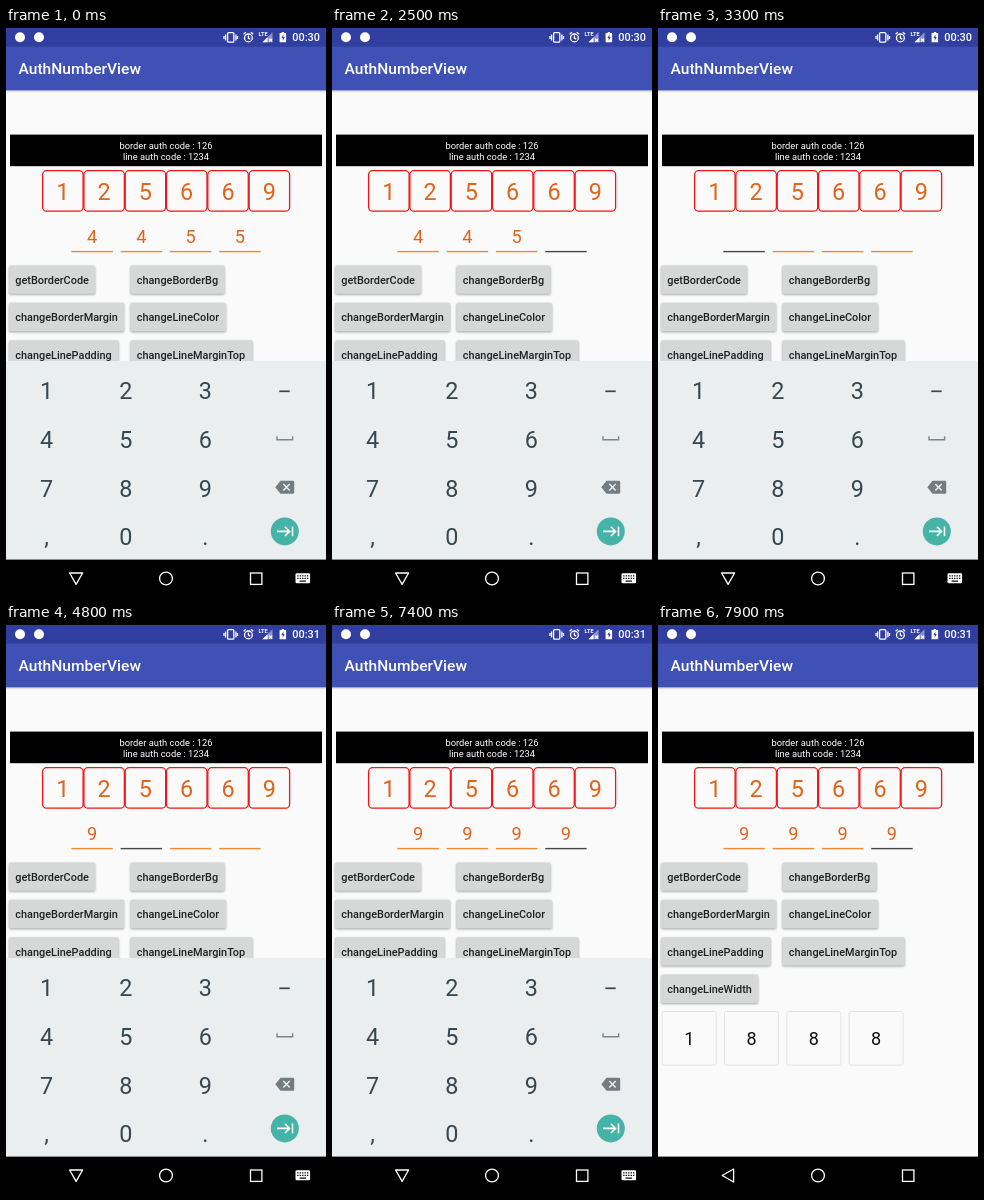
An HTML page for the animation above (8 s loop, 320 by 569 pixels).

```html
<!DOCTYPE html>
<html lang="en">
<head>
<meta charset="utf-8">
<title>AuthNumberView</title>
<style>
  html, body { margin: 0; width: 100%; height: 100%; overflow: hidden; background: #fafafa; }
  svg { display: block; width: 100%; height: 100%; font-family: Roboto, sans-serif; }
  .mid { text-anchor: middle; }
  .code { fill: #e0641c; }
  .button rect { fill: #d6d7d7; filter: drop-shadow(0 1px 1px rgba(0, 0, 0, .34)); }
  .button text { font-size: 10.9px; font-weight: 500; fill: #212121; }
  .key { font-size: 23.4px; fill: #37474f; }
  .outline { fill: none; stroke: #fff; stroke-width: 1.3; }
</style>
</head>
<body>
<svg viewBox="0 0 320 569" preserveAspectRatio="none">
  <defs>
    <linearGradient id="shade" x2="0" y2="1">
      <stop stop-opacity=".2"/>
      <stop offset="1" stop-opacity="0"/>
    </linearGradient>
  </defs>
  <rect width="320" height="569" fill="#fafafa"/>

  <rect y="62" width="320" height="3" fill="url(#shade)"/>
  <rect y="18" width="320" height="44.3" fill="#3f51b5"/>
  <rect width="320" height="18.7" fill="#303f9f"/>
  <text x="12.5" y="46.3" font-size="15.56" font-weight="500" fill="#fff">AuthNumberView</text>

  <g id="status" fill="#fff">
    <circle cx="14" cy="9.3" r="5"/>
    <circle cx="33" cy="9.3" r="5"/>
    <rect x="221.6" y="4.6" width="6.2" height="9.6" rx="1" class="outline"/>
    <path d="M219.6 6.5v6M218 8v3M229.9 6.5v6M231.5 8v3" class="outline" stroke-width="1"/>
    <circle cx="242.4" cy="9.9" r="3.9" class="outline"/>
    <path d="M242.4 7.5v2.6l1.8 1M237.6 6.3l2.3-2M247.2 6.3l-2.3-2" class="outline"/>
    <path d="M256.5 14.2l10-10v10z" opacity=".45"/>
    <path d="M256.5 14.2l5-5v5z"/>
    <text x="252.6" y="8.3" font-size="5.6" font-weight="700">LTE</text>
    <path d="M263.2 10.6l3 3m0-3l-3 3" class="outline" stroke-width="1"/>
    <path d="M275.7 4h2.4v1h2v9.3h-6.5V5h2.1z"/>
    <path d="M277.4 6.5l-2 3.6h1.3v2.6l2-3.6h-1.3z" fill="#303f9f"/>
    <text id="clock" x="286.3" y="13.2" font-size="10.9" font-weight="500"></text>
  </g>

  <rect x="4" y="106.6" width="312" height="31.6"/>
  <g class="mid" font-size="9.34" fill="#fff">
    <text x="160" y="120.5">border auth code : 126</text>
    <text x="160" y="131.5">line auth code : 1234</text>
  </g>

  <g id="page"></g>

  <g id="keyboard">
    <rect y="333" width="320" height="199" fill="#eaeeee"/>
    <rect id="press" y="435" width="79" height="48" fill="#d9dddd"/>
    <g id="keys" class="mid"></g>
    <path d="M273.3 363.3h10.4" stroke="#37474f" stroke-width="1.7"/>
    <path d="M271 408.3v3.4h15.6v-3.4" fill="none" stroke="#7b868a" stroke-width="1.4"/>
    <path d="M274.5 452.8h12.3q1.4 0 1.4 1.4v10.2q0 1.4-1.4 1.4h-12.3l-5.2-6.5z" fill="#737d81"/>
    <path d="M277.3 456l6.4 6.6m0-6.6l-6.4 6.6" stroke="#eaeeee" stroke-width="1.5"/>
    <circle cx="278.8" cy="503.4" r="14" fill="#45b3a7"/>
    <path d="M271 503.4h12.5m-4.6-4.6l4.6 4.6l-4.6 4.6M286.5 498.6v9.6" class="outline" style="stroke-width:1.6"/>
  </g>

  <rect y="531.6" width="320" height="38" fill="#000"/>
  <path id="back" d="M63.6 545h13l-6.5 11.4z" class="outline" stroke-linejoin="round"/>
  <circle cx="160" cy="550.5" r="6.4" class="outline"/>
  <rect x="244.5" y="545" width="11.4" height="11.4" class="outline"/>
  <g id="switcher">
    <rect x="289.5" y="545.3" width="14.6" height="10" rx="1.2" fill="#fff"/>
    <path d="M291.2 547.8h11.2M291.2 550.3h11.2" stroke="#000" stroke-width="1.3" stroke-dasharray="1.3 1.15"/>
    <path d="M293.6 553.1h6.4" stroke="#000" stroke-width="1.2"/>
  </g>
</svg>
<script>
const NS = 'http://www.w3.org/2000/svg';
const byId = id => document.getElementById(id);

function add(parent, tag, attrs, text = '') {
  const node = document.createElementNS(NS, tag);
  for (const name in attrs) node.setAttribute(name, attrs[name]);
  node.textContent = text;
  return parent.appendChild(node);
}

const page = byId('page');

[...'125669'].forEach((digit, i) => {
  const x = 36.6 + i * 41.3;
  add(page, 'rect', { x, y: 142.7, width: 40.5, height: 40.5, rx: 4, fill: 'none', stroke: '#f01414', 'stroke-width': 1.3 });
  add(page, 'text', { x: x + 20.2, y: 171.8, class: 'mid code', 'font-size': 23.4 }, digit);
});

const slots = [0, 1, 2, 3].map(i => {
  const x = 65.3 + i * 49.3;
  return {
    digit: add(page, 'text', { x: x + 20.7, y: 215.2, class: 'mid code', 'font-size': 18.2 }),
    line: add(page, 'rect', { x, y: 222.9, width: 41.5, height: 1.4 })
  };
});

[
  [['getBorderCode', 86], ['changeBorderBg', 94]],
  [['changeBorderMargin', 115], ['changeLineColor', 95.5]],
  [['changeLinePadding', 109.5], ['changeLineMarginTop', 122]],
  [['changeLineWidth', 97]]
].forEach((row, r) => row.forEach(([label, width], c) => {
  const x = 3.1 + c * 121.4, y = 237.4 + r * 37.4;
  const button = add(page, 'g', { class: 'button' });
  add(button, 'rect', { x, y, width, height: 28.4, rx: 1.5 });
  add(button, 'text', { x: x + 6.2, y: y + 18.3 }, label);
}));

[...'1888'].forEach((digit, i) => {
  const x = 4.2 + i * 62.3;
  add(page, 'rect', { x, y: 386.5, width: 54, height: 53.6, rx: 2, fill: 'none', stroke: '#e3e3e3' });
  add(page, 'text', { x: x + 27, y: 420, class: 'mid', 'font-size': 18, fill: '#111' }, digit);
});

['123', '456', '789', ',0.'].forEach((row, r) => [...row].forEach((key, c) =>
  add(byId('keys'), 'text', { x: 40.5 + c * 79.4, y: 371.3 + r * 48.6, class: 'key' }, key)));

// [start ms, entered digits, focused slot, pressed key]
const states = [
  [0, '4455', -1], [1400, '4455', 3],
  [2300, '445', 3, 'del'], [2500, '445', 3],
  [2600, '44', 2, 'del'], [2800, '44', 2],
  [2900, '4', 1, 'del'], [3100, '4', 1],
  [3200, '', 0, 'del'], [3300, '', 0],
  [4800, '9', 1], [4900, '9', 1, 'nine'],
  [5000, '99', 2], [5200, '99', 2, 'nine'],
  [5300, '999', 3], [5500, '999', 3, 'nine'],
  [5600, '9999', 3]
];
const LOOP = 8000, TICK = 100;
const pressX = { del: 239.4, nine: 159.8 };

function draw(time) {
  const t = Math.floor(time % LOOP / TICK) * TICK;
  const [, digits, focus, pressed] = states.findLast(state => state[0] <= t);

  slots.forEach(({ digit, line }, i) => {
    digit.textContent = digits[i] || '';
    line.setAttribute('fill', i === focus ? '#484848' : '#f08a35');
  });
  byId('clock').textContent = t < 4800 ? '00:30' : '00:31';
  byId('press').setAttribute('visibility', pressed ? 'inherit' : 'hidden');
  byId('press').setAttribute('x', pressX[pressed] || 0);

  // The keyboard sinks and fades while the back arrow turns.
  const hide = Math.min(1, Math.max(0, (t - 7400) / 300));
  byId('keyboard').setAttribute('transform', `translate(0 ${20 * hide * hide})`);
  byId('keyboard').setAttribute('opacity', 1 - hide);
  byId('back').setAttribute('transform', `rotate(${90 * hide} 70.1 550.5)`);
  byId('switcher').setAttribute('opacity', hide ? 0 : 1);
}

const start = performance.now();
function tick() {
  draw(performance.now() - start);
  requestAnimationFrame(tick);
}
tick();
</script>
</body>
</html>
```
